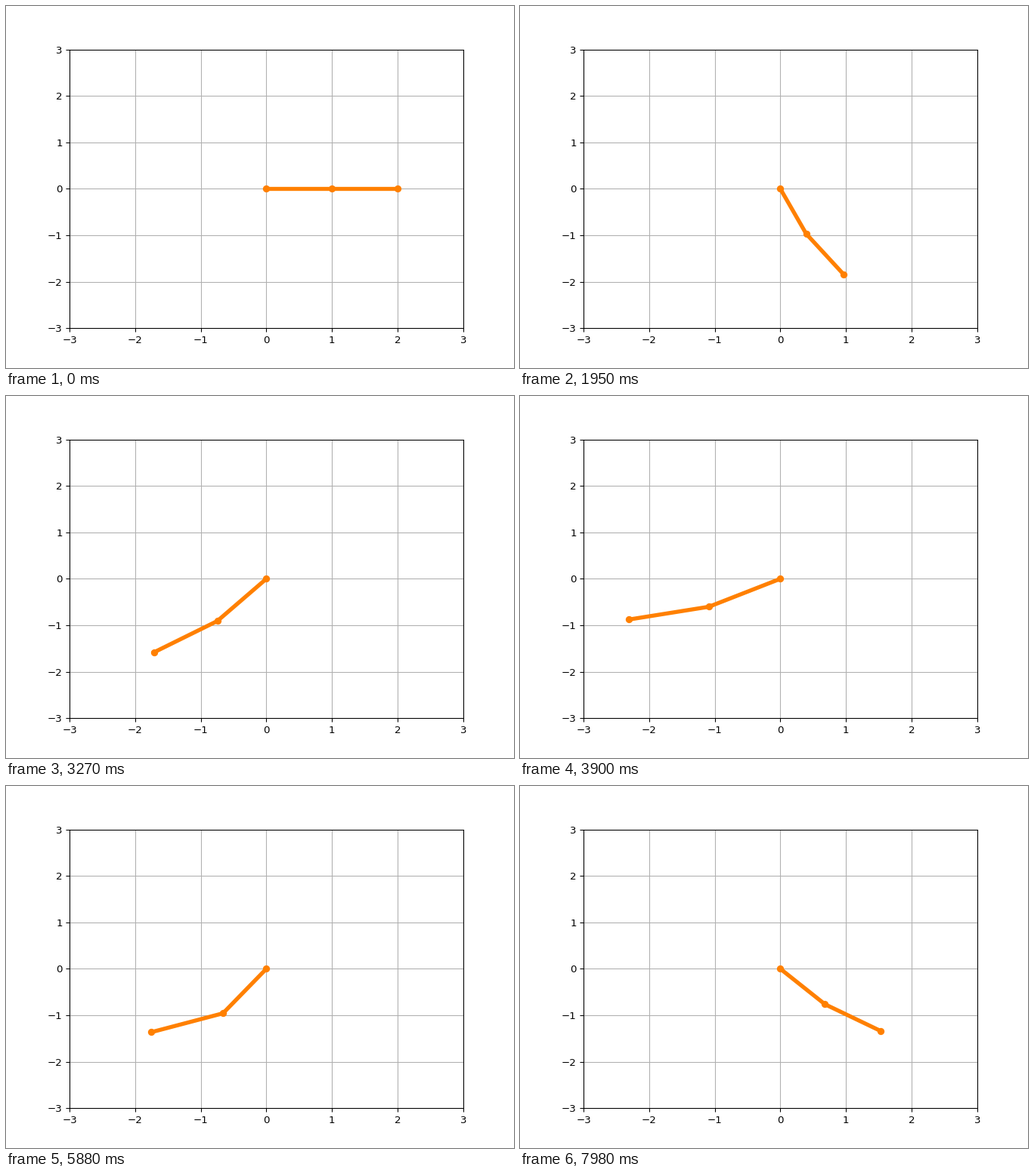
A matplotlib script that plays this animation: 672 by 480 pixels, repeating every 8000 ms.

```python
import numpy as np
import matplotlib.pyplot as plt
from matplotlib.animation import FuncAnimation

STEPS = 267
LOOP_MS = 8000
ORANGE = "#ff8000"

# Key poses of the swing, angles in degrees below the +x axis
KEY_STEP = np.array([0, 42, 66, 88, 130, 162, 196, 237, 266])
UPPER = np.array([0, 34.8, 69.3, 100.2, 151.1, 153.9, 124.6, 85, 48.3])
LOWER = np.array([0, 18.6, 59, 109, 167.3, 180.5, 159.6, 72.5, 34.1])


def swing(angles, end_speed, at):
    """Angle in radians at steps `at`: smooth spline, starting from rest."""
    h = np.diff(KEY_STEP)
    rise = np.diff(angles) / h
    n = len(angles)
    system = np.eye(n)
    rhs = np.zeros(n)
    rhs[-1] = end_speed
    for i in range(1, n - 1):
        a, b = h[i - 1], h[i]
        system[i, i - 1:i + 2] = b, 2 * (a + b), a
        rhs[i] = 3 * (b * rise[i - 1] + a * rise[i])
    speed = np.linalg.solve(system, rhs)

    k = np.clip(np.searchsorted(KEY_STEP, at, side="right") - 1, 0, n - 2)
    u = (at - KEY_STEP[k]) / h[k]
    v = 1 - u
    value = (v * v * (1 + 2 * u) * angles[k]
             + u * u * (1 + 2 * v) * angles[k + 1]
             + u * v * h[k] * (v * speed[k] - u * speed[k + 1]))
    return np.radians(value)


steps = np.arange(STEPS)
upper = swing(UPPER, -1.28, steps)
lower = swing(LOWER, -0.85, steps)

# Both rods lengthen as the upper one swings away from the start
length = 1 + 0.032 * np.abs(upper) ** 2.1

x1, y1 = length * np.cos(upper), -length * np.sin(upper)
x2, y2 = x1 + length * np.cos(lower), y1 - length * np.sin(lower)

plt.rcParams["font.family"] = "DejaVu Sans"
fig, ax = plt.subplots(figsize=(7, 5), dpi=96)
ax.set(xlim=(-3, 3), ylim=(-3, 3))
ax.grid(True)
rods, = ax.plot([], [], "o-", color=ORANGE, lw=4)


def draw(i):
    rods.set_data([0, x1[i], x2[i]], [0, y1[i], y2[i]])
    return rods,


anim = FuncAnimation(fig, draw, frames=STEPS, interval=LOOP_MS / STEPS,
                     repeat=True, repeat_delay=0)
plt.show()
```
